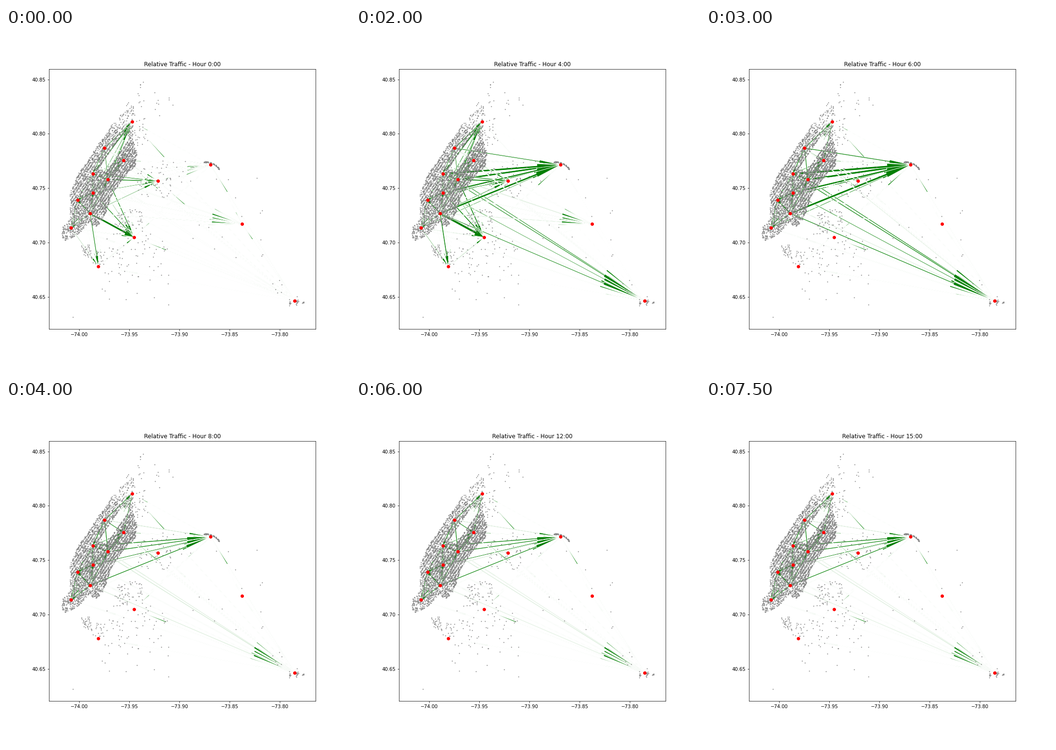
Animation, 720 px wide and 720 px high, one loop 8 s. Source, as a matplotlib script:

```python
import numpy as np
import matplotlib.pyplot as plt
from matplotlib.animation import FuncAnimation
from matplotlib.path import Path

SX, SY = 2100, 2275  # pixels per degree

# Zone centres in stage pixels, in drawing order
ZONES = dict(
    C=(246.3, 277.3), M=(268, 438), A=(264, 196.3), K=(428.3, 286.3), O=(604.3, 571),
    J=(318.3, 320.3), L=(494.3, 410.3), N=(193.3, 499), I=(136.2, 418.5), G=(149.5, 360),
    E=(213.3, 317.3), D=(181.5, 305.3), F=(182.3, 344.5), H=(176.3, 388), B=(206.3, 251.3))
LOCAL = "ABCDEFGHI"
PUSH = dict(D=1, E=.95, F=.8, H=.95, G=.5, B=.5, C=.45, I=.4, N=.2)
NIGHT = dict(A=(3.8, 150), M=(4.8, 45), N=(3, 45), J=(2.9, 110), L=(1.2, np.inf))  # width, reach
AIRPORTS = dict(K=3.9, O=2)


def geo(points):
    p = np.asarray(points, float)
    return np.column_stack((-74 + (p[:, 0] - 153.2) / SX, 40.85 - (p[:, 1] - 107.7) / SY))


def rise(hour, at, span):
    return 1 / (1 + np.exp((at - hour) / span))


def bump(hour, at, span):
    return np.exp(-((hour - at) / span) ** 2)


def width(a, b, hour, mood):
    """Arrow width in pixels: nightlife, flights, arrivals and local trips."""
    gap = np.hypot(*np.subtract(ZONES[a], ZONES[b]))
    push = PUSH.get(a, .02)
    w = 0
    if b in NIGHT:
        size, reach = NIGHT[b]
        late = (.8 + .2 * np.sin(np.pi * hour / 6)) * rise(5.1, hour, .35)
        w = size * late * push * np.exp((110 - gap) / reach)
    elif b in AIRPORTS:
        w = AIRPORTS[b] * push * (.17 + bump(hour, 4.8, 1.6) + .4 * rise(hour, 5, .5))
    if a in AIRPORTS:
        w = max(w, (.7 if a == "O" else .55) * (1 - bump(hour, 2.7, 1.6)))
    if a in LOCAL and b in LOCAL:
        w = max(w, 4.2 * mood * np.exp(-gap / 90) * (.8 + .2 * rise(hour, 5, .5)))
    return w


def island_dots(rng, n=4300):
    shore = Path([
        (117, 440), (118, 412), (134, 400), (134, 345), (152, 303), (190, 247), (235, 183),
        (258, 153), (268, 153), (266, 235), (274, 262), (270, 288), (242, 318), (220, 350),
        (205, 398), (189, 416), (172, 408), (154, 428), (126, 446)])
    # s runs along the avenues, t across them
    s = rng.uniform(-175, 190, 40 * n)
    t = rng.uniform(-45, 80, 40 * n)
    grid = (rng.random(s.size) < .6) & (s > -95)
    t = np.where(grid, 5.1 * np.round(t / 5.1) + rng.normal(0, .5, s.size), t)
    p = np.column_stack((191 + .565 * s + .93 * t, 295 - .825 * s + .37 * t))
    density = (.15 + .7 * rise(90, s, 9)) * (.55 + .45 * rise(s, -95, 15))
    density *= .65 + .35 * rise(t, 5, 5)
    park = (s > 1) & (s < 88) & (t > .8) & (t < 19.5)
    density = np.where(park, .015, density)
    keep = shore.contains_points(p) & (rng.random(s.size) < density)
    return p[keep][:n]


def outer_dots(rng):
    boxes = [(46, 275, 345, 278, 354), (12, 335, 400, 278, 330), (28, 262, 297, 182, 245),
             (34, 230, 285, 378, 430), (60, 205, 340, 425, 520), (10, 274, 290, 110, 170),
             (9, 303, 350, 116, 195), (16, 380, 540, 310, 480), (12, 125, 390, 525, 605),
             (6, 556, 583, 520, 570)]
    blobs = [(28, 242, 410, 8, 9), (34, 168, 466, 7, 7), (22, 194, 482, 9, 8),
             (10, 594, 573, 1, 3), (18, 608, 572, 2, 4), (6, 622, 574, 1, .7)]
    parts = [rng.uniform((x0, y0), (x1, y1), (n, 2)) for n, x0, x1, y0, y1 in boxes]
    parts += [rng.normal((x, y), (dx, dy), (n, 2)) for n, x, y, dx, dy in blobs]
    u = rng.random(65)
    bow = np.column_stack((414 + 32 * u, 281 + 14 * u ** 2 - 2 * np.sin(np.pi * u)))
    return np.vstack(parts + [bow + rng.normal(0, .7, bow.shape)])


rng = np.random.default_rng(12)
dots = geo(np.vstack((island_dots(rng), outer_dots(rng))))
centres = dict(zip(ZONES, geo(list(ZONES.values()))))
moods = {(a, b): rng.uniform(.75, 1.25) for a in ZONES for b in ZONES if a != b}

fig = plt.figure(figsize=(10, 10), dpi=72)
ax = fig.add_axes([.125, .125, .775, .755])
ax.scatter(*dots.T, s=1, c="gray", zorder=1.5)
ax.plot(*np.array(list(centres.values())).T, "ro")
(x0, y0), (x1, y1) = geo([(90, 630), (648, 86.4)])
ax.set(xlim=(x0, x1), ylim=(y0, y1))
ax.set_xticks(np.arange(-74, -73.79, .05))
ax.set_yticks(np.arange(40.65, 40.86, .05))
ax.xaxis.set_major_formatter("{x:.2f}")
ax.yaxis.set_major_formatter("{x:.2f}")
arrows = []


def draw(hour):
    while arrows:
        arrows.pop().remove()
    for (a, b), mood in moods.items():
        w = width(a, b, hour, mood)
        if w < .02:
            continue
        start, step = centres[a], centres[b] - centres[a]
        arrows.append(ax.arrow(*start, *step, width=w / 2190, head_length=.2 * np.hypot(*step),
                               length_includes_head=True, fc="green", ec="white"))
    ax.set_title(f"Relative Traffic - Hour {hour}:00", pad=6.5)
    return arrows


anim = FuncAnimation(fig, draw, frames=16, interval=500, init_func=lambda: draw(0),
                     repeat=True, repeat_delay=0)
plt.show()
```
